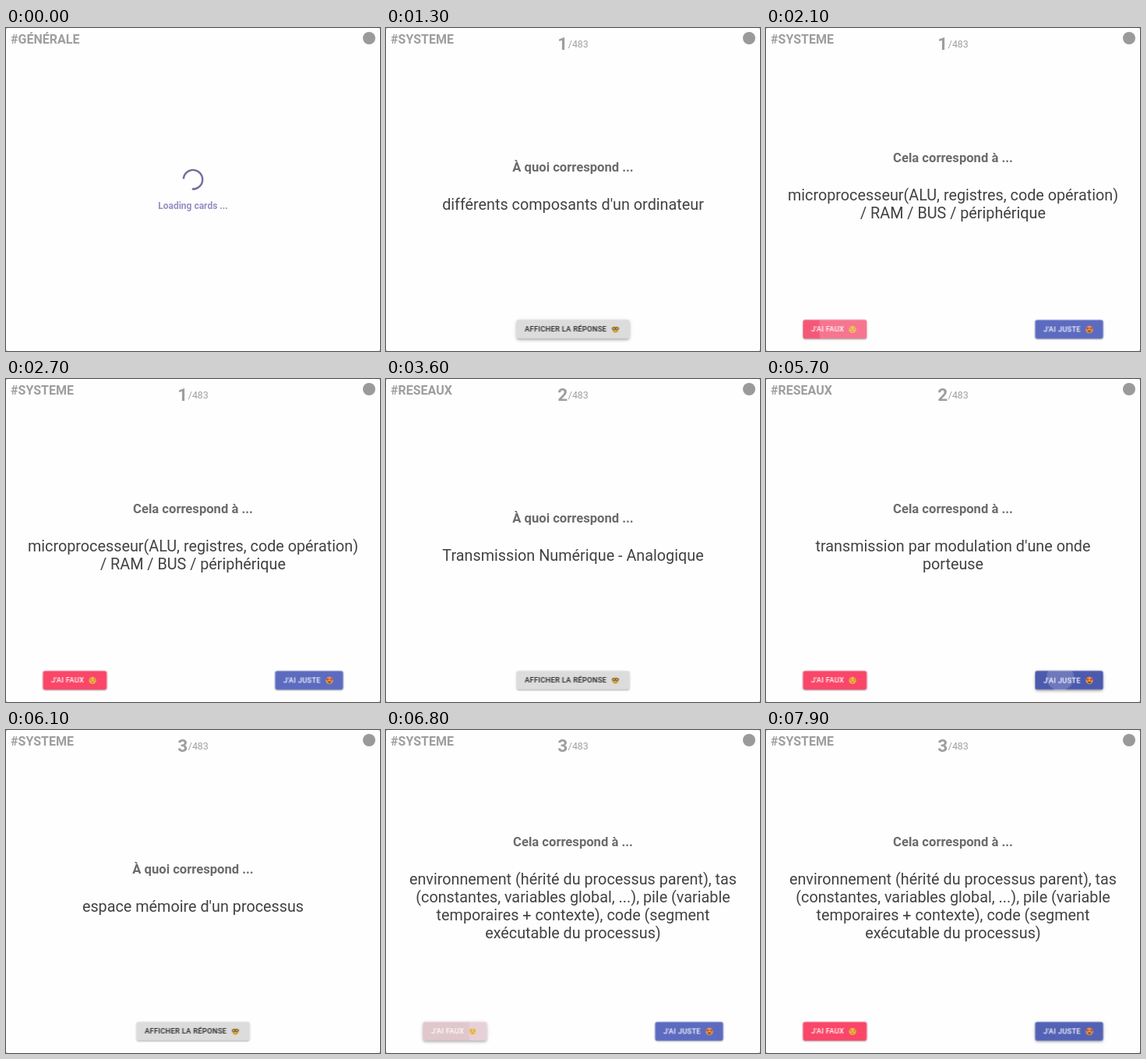
An HTML page that plays this animation: 480 by 414 pixels, repeating every 8000 ms.

```html
<!DOCTYPE html>
<html lang="fr">
<head>
<meta charset="utf-8">
<title>Cartes</title>
<style>
  :root {
    --loop: 8s;
    --ease: cubic-bezier(.4, 0, .2, 1);
    --grey: #dcdcdc;
    --red: #f94669;
    --blue: #5c6bc0;
    --rest: 0 3px 1px -2px rgba(0,0,0,.2), 0 2px 2px 0 rgba(0,0,0,.14), 0 1px 5px 0 rgba(0,0,0,.12);
    --raised: 0 2px 4px -1px rgba(0,0,0,.2), 0 4px 5px 0 rgba(0,0,0,.14), 0 1px 10px 0 rgba(0,0,0,.12);
  }
  html, body { margin: 0; width: 100%; height: 100%; overflow: hidden; background: #c4c4c4; }
  .stage {
    position: relative; width: 480px; height: 414px; overflow: hidden;
    background: #fefefe; border-radius: 3px; font-family: Roboto, sans-serif;
  }
  .stage > svg { position: absolute; inset: 0; }

  .tag { font: 700 16px Roboto, sans-serif; fill: #9e9e9e; }
  .num { font: 700 22.67px Roboto, sans-serif; fill: #9e9e9e; text-anchor: end; }
  .total { font: 400 12.4px Roboto, sans-serif; fill: #a0a0a0; }
  .head { font: 700 16.6px Roboto, sans-serif; fill: #6b6b6b; text-anchor: middle; }
  .body { font: 400 19.8px Roboto, sans-serif; fill: #424242; text-anchor: middle; }
  .wait { font: 700 12px Roboto, sans-serif; fill: #9490c6; text-anchor: middle; }

  .spin {
    fill: none; stroke: #5f5b91; stroke-width: 3.6;
    animation: turn var(--loop) linear infinite, dash var(--loop) ease-in-out infinite;
  }
  @keyframes turn { from { transform: rotate(144deg); } to { transform: rotate(2201.14deg); } }
  @keyframes dash {
    0% { stroke-dasharray: 95 200; stroke-dashoffset: -14; }
    1.75% { stroke-dasharray: 100 200; stroke-dashoffset: -15; }
    10.5%, 100% { stroke-dasharray: 100 200; stroke-dashoffset: -125; }
  }

  /* Buttons are laid out on a 720px wide page shown at two thirds. */
  .page { position: absolute; width: 720px; height: 621px; transform: scale(.66667); transform-origin: 0 0; }
  .btn {
    position: absolute; top: 561px; height: 36px; border-radius: 4px; overflow: hidden;
    font: 500 14px/36px Roboto, sans-serif; letter-spacing: .02857em;
  }
  .btn span { position: absolute; left: 16px; white-space: nowrap; }
  .btn svg { width: 15px; height: 15px; margin-left: 9px; vertical-align: -2.5px; }
  .btn i { position: absolute; border-radius: 50%; background: currentColor; opacity: 0; transform: scale(0); }

  .main {
    animation: place var(--loop) step-end infinite, tone var(--loop) var(--ease) infinite,
      lift var(--loop) var(--ease) infinite;
  }
  .main i {
    left: -3px; top: -164px; width: 360px; height: 360px;
    animation: grow var(--loop) var(--ease) infinite, fade var(--loop) ease-in-out infinite;
  }
  .ask { animation: ask var(--loop) step-end infinite; }
  .no, .good { animation: answer var(--loop) step-end infinite; }
  .good { left: 518px; width: 130.5px; color: #fff; }
  .good .face {
    position: absolute; inset: 0;
  }
  .good { animation: answer var(--loop) step-end infinite, aim var(--loop) var(--ease) infinite; }
  .good i {
    left: -38px; top: -74px; width: 172px; height: 172px;
    animation: tap var(--loop) var(--ease) infinite;
  }

  @keyframes place {
    0% { opacity: 0; }
    5.625%, 100% { opacity: 1; }
    0%, 40.75%, 72.125% { left: 251px; width: 217.5px; color: #222; }
    24.375%, 55.625%, 84.375%, 100% { left: 71px; width: 123px; color: #fff; }
  }
  @keyframes ask {
    0%, 40.75%, 72.125% { opacity: 1; }
    24.375%, 55.625%, 84.375%, 100% { opacity: 0; }
  }
  @keyframes answer {
    0%, 40.75%, 72.125% { opacity: 0; }
    24.375%, 55.625%, 84.375%, 100% { opacity: 1; }
  }
  @keyframes tone {
    0%, 24.375%, 43.875%, 55.625%, 75.25%, 84.375% { background-color: var(--grey); }
    27.5%, 40.75%, 58.75%, 72.125%, 87.5%, 100% { background-color: var(--red); }
  }
  @keyframes lift {
    0%, 15.375%, 27.5%, 45.625%, 58.75%, 79.125%, 87.5%, 100% { box-shadow: var(--rest); }
    16.25%, 24.375%, 48.125%, 55.625%, 80%, 84.375% { box-shadow: var(--raised); }
  }
  @keyframes aim {
    0%, 34.375%, 40.76%, 68.125%, 72.13%, 97.25% { background-color: var(--blue); box-shadow: var(--rest); }
    37.5%, 40.75%, 71.25%, 72.125% { background-color: #4c5aae; box-shadow: var(--raised); }
    100% { background-color: #5160b3; box-shadow: var(--raised); }
  }
  @keyframes grow {
    0%, 22.625%, 32.6%, 53.875%, 63.85%, 82.625%, 92.6%, 100% { transform: scale(0); }
    29.5%, 32.5%, 60.75%, 63.75%, 89.5%, 92.5% { transform: scale(1); }
  }
  @keyframes fade {
    0%, 22.62%, 32.5%, 53.87%, 63.75%, 82.62%, 92.5%, 100% { opacity: 0; }
    22.625%, 53.875%, 82.625% { opacity: .1; }
    24.375%, 55.625%, 84.375% { opacity: .2; }
  }
  @keyframes tap {
    0%, 38.24%, 40.76%, 69.99%, 72.13%, 100% { transform: scale(0); opacity: 0; }
    38.25%, 70% { transform: scale(0); opacity: .1; }
    40.75%, 72.125% { transform: scale(.35); opacity: .2; }
  }
</style>
</head>
<body>
<div class="stage">
  <svg width="480" height="414" viewBox="0 0 480 414">
    <circle cx="466" cy="13" r="8" fill="#9a9a9a"/>
    <g id="scenes"></g>
  </svg>

  <div class="page">
    <div class="btn main">
      <span class="ask">AFFICHER LA RÉPONSE<svg viewBox="0 0 20 20">
        <circle cx="10" cy="10" r="9" fill="#f5c242"/>
        <path d="M1 7h18" stroke="#4a3a2a" stroke-width="2"/>
        <g fill="#e9e3d0" stroke="#4a3a2a" stroke-width="2"><circle cx="6" cy="8" r="3.2"/><circle cx="14" cy="8" r="3.2"/></g>
        <path d="M5 13h10q-1 4-5 4t-5-4z" fill="#8a5a20"/><path d="M8 13h4v2H8z" fill="#fff"/>
      </svg></span>
      <span class="no">J'AI FAUX<svg viewBox="0 0 20 20">
        <circle cx="10" cy="10" r="9" fill="#f7bd45"/>
        <path d="M4 9q2 2 4 0M12 9q2 2 4 0M7 15q3-2 6 0M4 6l3-1M16 6l-3-1" fill="none" stroke="#7a4a1c" stroke-width="1.5"/>
      </svg></span>
      <i></i>
    </div>
    <div class="btn good">
      <span>J'AI JUSTE<svg viewBox="0 0 20 20">
        <circle cx="10" cy="10" r="9" fill="#f5b042"/>
        <path id="heart" d="M5.5 11.5L2 7.500q-.5-3 2-3 1.500 0 1.500 1.500 0-1.500 1.500-1.500 2.500 0 2 3z" fill="#d8323c"/>
        <use href="#heart" x="9"/>
        <path d="M5 12.500h10q-1 4.500-5 4.500t-5-4.500z" fill="#6b3a1c"/>
      </svg></span>
      <i></i>
    </div>
  </div>
</div>

<script>
  const LOOP = 8000, PITCH = 23.1;
  const ASK = "À quoi correspond ...", TELL = "Cela correspond à ...";
  const cards = [
    { at: 450, tag: "SYSTEME", num: 1, head: ASK, lines: ["différents composants d'un ordinateur"] },
    { at: 1950, tag: "SYSTEME", num: 1, head: TELL, lines: [
      "microprocesseur(ALU, registres, code opération)", "/ RAM / BUS / périphérique"] },
    { at: 3260, tag: "RESEAUX", num: 2, head: ASK, lines: ["Transmission Numérique - Analogique"] },
    { at: 4450, tag: "RESEAUX", num: 2, head: TELL, lines: [
      "transmission par modulation d'une onde", "porteuse"] },
    { at: 5770, tag: "SYSTEME", num: 3, head: ASK, lines: ["espace mémoire d'un processus"] },
    { at: 6750, tag: "SYSTEME", num: 3, head: TELL, lines: [
      "environnement (hérité du processus parent), tas", "(constantes, variables global, ...), pile (variable",
      "temporaires + contexte), code (segment", "exécutable du processus)"] },
  ];

  const text = (cls, x, y, s) => `<text class="${cls}" x="${x}" y="${y}">${s}</text>`;

  function drawCard({ tag, num, head, lines }) {
    const top = 195.1 - lines.length * PITCH / 2;
    return text("tag", 6, 20, "#" + tag) + text("num", 233.2, 28, num) + text("total", 233.8, 24.6, "/483") +
      text("head", 240, top, head) +
      lines.map((s, i) => text("body", 240, top + 49 + i * PITCH, s)).join("");
  }

  const loading = text("tag", 6, 20, "#GÉNÉRALE") + text("wait", 240, 232, "Loading cards ...") +
    '<g transform="translate(240 194.3) scale(.606)"><circle class="spin" r="20.2"/></g>';

  const scenes = [{ at: 0, art: loading }, ...cards.map(c => ({ at: c.at, art: drawCard(c) }))];
  const pct = ms => ms / LOOP * 100 + "%";
  let css = "", art = "";
  scenes.forEach((s, i) => {
    const end = scenes[i + 1]?.at ?? LOOP;
    css += `@keyframes scene${i} { 0% { opacity: 0 } ${pct(s.at)} { opacity: 1 } ${pct(end)}, 100% { opacity: 0 } }`;
    art += `<g style="animation: scene${i} var(--loop) step-end infinite">${s.art}</g>`;
  });
  document.head.appendChild(document.createElement("style")).textContent = css;
  document.getElementById("scenes").innerHTML = art;
</script>
</body>
</html>
```
